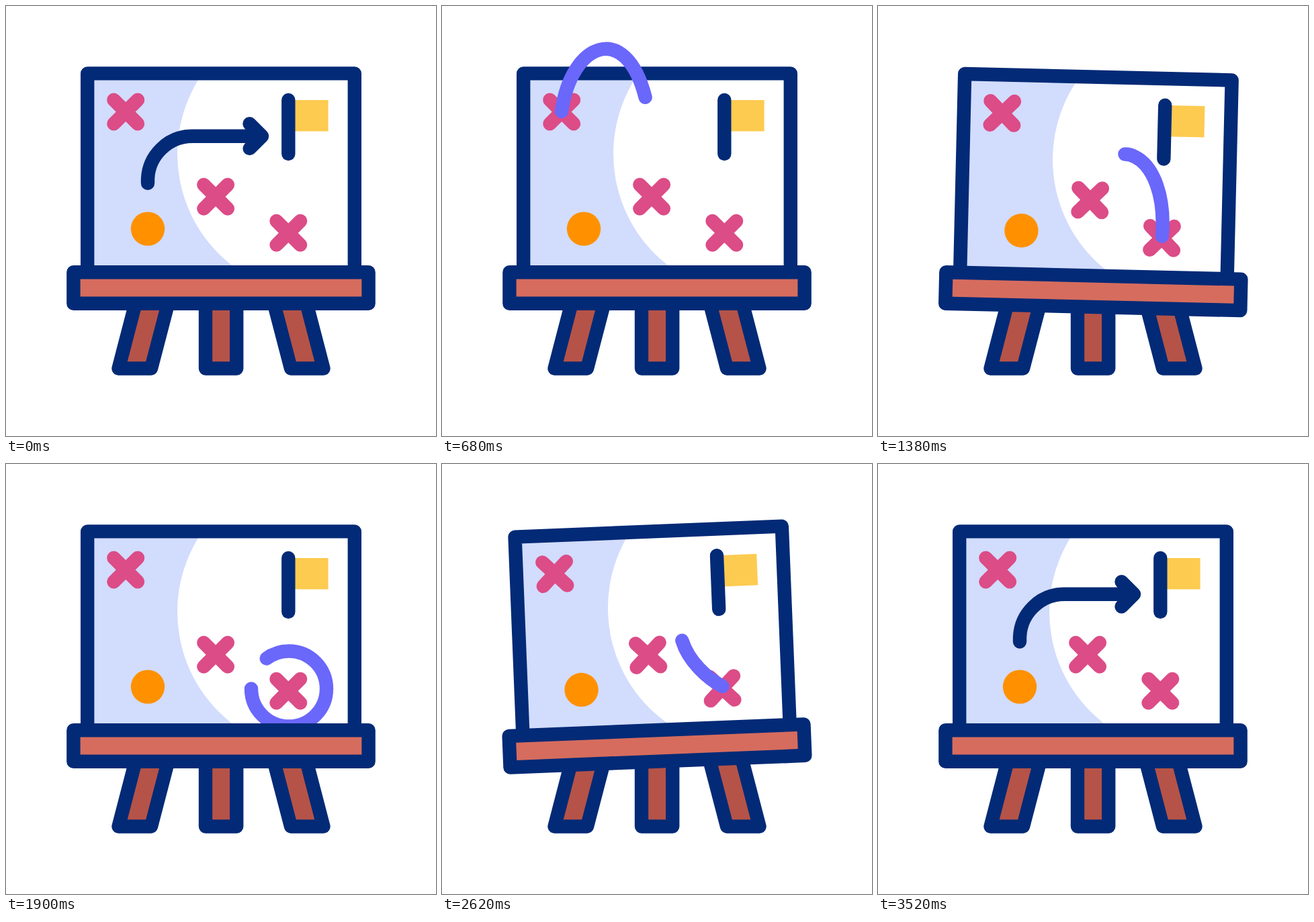
Write an HTML page that moves like this. It is 640 px wide and 640 px high and loops after 3600 ms.

```html
<!DOCTYPE html>
<html lang="en">
<head>
<meta charset="utf-8">
<title>Strategy board</title>
<style>
  html, body { margin: 0; height: 100%; overflow: hidden; background: #fff; }
  svg { display: block; width: 100vw; height: 100vh; }
  .line { fill: none; stroke: #032a76; stroke-width: 20.4; stroke-linecap: round; stroke-linejoin: round; }
  .leg { fill: #b55348; }
  .cross { stroke: #dc4c87; }
  .route { stroke: #6a67fb; }
</style>
</head>
<body>
<svg viewBox="0 0 640 640">
  <path class="line leg" d="M196 430L167.5 539.5H216L244.6 430Z"/>
  <path class="line leg" d="M297 430H343.2V539.5H297Z"/>
  <path class="line leg" d="M444 430L472.5 539.5H424L395.4 430Z"/>
  <g id="board">
    <path fill="#fff" d="M121 100H519V396H121Z"/>
    <path fill="#d2dcfd" d="M121 100H292.7A210 210 0 0 0 350.4 396H121Z"/>
    <path class="line" d="M121.2 396V100.4H518.8V396"/>
    <path fill="#fdcb50" d="M420 140H479.6V186.5H420Z"/>
    <path class="line" d="M420.3 140V220"/>
    <circle cx="211" cy="331.6" r="25.2" fill="#ff9100"/>
    <path class="line cross" d="M160.4 139.7l35.6 35.6m0-35.6l-35.6 35.6"/>
    <path class="line cross" d="M294.3 266l35.6 35.6m0-35.6l-35.6 35.6"/>
    <path class="line cross" d="M402.5 320l35.6 35.6m0-35.6l-35.6 35.6"/>
    <path class="line" id="shaft" pathLength="1" d="M211 264.5V260A66.500 66.500 0 0 1 277.500 193.700H380"/>
    <path class="line" id="tip" pathLength="1" d="M362.500 175.200L381 193.700L362.500 212.200"/>
    <path class="line route" id="hops" pathLength="1" d="M178 157C196 25 326 8 312 274C330 215 358 208 378 218C405 231 424 275 420.500 335"/>
    <path class="line route" id="ring" pathLength="1" d="M365 334.500A56 56 0 0 0 477 334.500A56 56 0 0 0 365 334.500"/>
    <path class="line route" id="loop" pathLength="1" d="M421 335C470 345 552 330 552 270C552 170 500 102 440 102C390 102 361 180 361 245C361 285 395 320 421 335"/>
    <path class="line" style="fill:#d66c5e" d="M100.400 396.200H539.600V442.700H100.400Z"/>
  </g>
</svg>
<script>
const LOOP = 3600, TILT = 2.3;
const el = id => document.getElementById(id);

// Progress from 0 to 1 between two times
const ramp = (t, from, to) => Math.min(1, Math.max(0, (t - from) / (to - from)));
const smooth = (t, from, to) => {
  const k = ramp(t, from, to);
  return k * k * (3 - 2 * k);
};

// Show only the part of a path between two fractions
function trim(id, start, end) {
  const { style } = el(id);
  style.visibility = end > start ? 'visible' : 'hidden';
  style.strokeDasharray = end - start < 1 ? `${end - start} 3` : 'none';
  style.strokeDashoffset = -start;
}

function draw(t) {
  const right = TILT * (smooth(t, 965, 1080) - smooth(t, 1180, 1640));
  const left = TILT * (smooth(t, 2000, 2150) - smooth(t, 2690, 3440));
  el('board').setAttribute('transform',
    `rotate(${right} 101 435) rotate(${-left} 320 420)`);

  const redraw = t > 2000;
  trim('shaft', redraw ? 0 : ramp(t, 0, 300), redraw ? ramp(t, 3120, 3420) : 1);
  trim('tip', 0, redraw ? ramp(t, 3200, 3500) : 1 - ramp(t, 0, 390));

  trim('hops', ramp(t, 780, 1580), ramp(t, 380, 1180));
  trim('ring', ramp(t, 1980, 2360), ramp(t, 1580, 1957));

  // The loop is run twice
  const lap = t < 2700 ? 0 : 540;
  trim('loop', ramp(t - lap, 2300, 2672), ramp(t - lap, 2170, 2560));
}

function tick() {
  draw(performance.now() % LOOP);
  requestAnimationFrame(tick);
}
tick();
</script>
</body>
</html>
```
